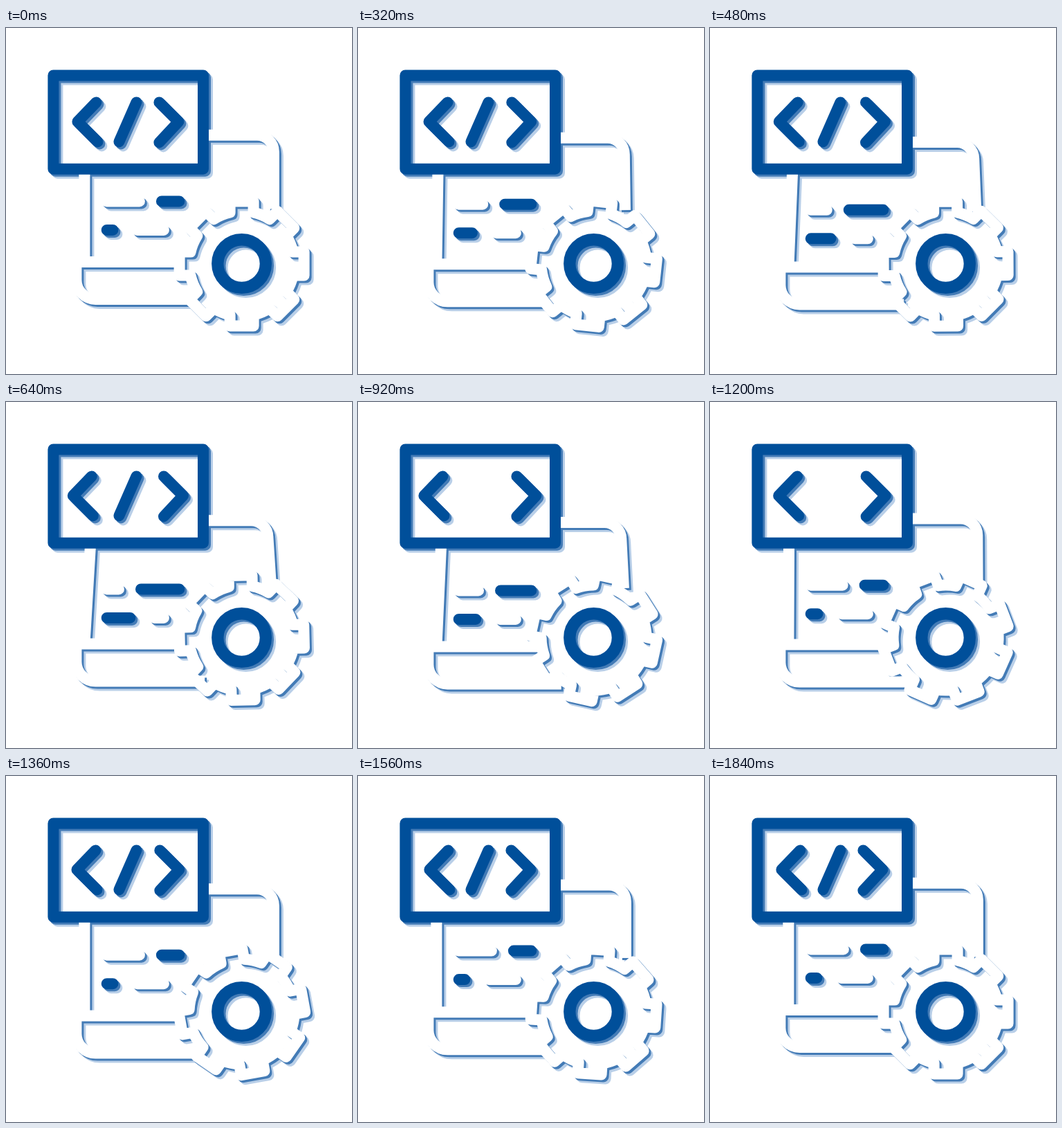
Animation, 500 px wide and 500 px high, one loop 2 s. Source, as an HTML page:

```html
<!DOCTYPE html>
<html lang="en">
<head>
<meta charset="utf-8">
<title>Code and gear</title>
<style>
  html, body { margin: 0; width: 100%; height: 100%; overflow: hidden; background: #fff; }
  svg { display: block; width: 100vw; height: 100vh; }
  #art {
    fill: none; stroke-width: 16;
    filter: drop-shadow(3px 3px 0 #437bb6) drop-shadow(3px 3px 0 #b9cfe8);
  }
  .white { stroke: #fff; }
  .blue { stroke: #004f9a; stroke-linecap: round; stroke-linejoin: round; }
  .bar { stroke-linecap: round; }
</style>
</head>
<body>
<svg viewBox="0 0 500 500">
  <g id="art" transform="translate(-.6 -.6)">
    <path id="page" class="white"/>
    <path id="tray" class="white"/>
    <path id="whiteBars" class="white bar"/>
    <path id="blueBars" class="blue"/>
    <path id="gear" class="white" stroke-linejoin="round"/>
    <circle class="blue" cx="341.2" cy="341.2" r="34.8" stroke-width="17.4"/>
    <rect class="blue" x="69" y="69" width="216.6" height="135.3"/>
    <path id="left" class="blue" d="M131 108L104 136L133 165"/>
    <path id="slash" class="blue" d="M189 108L164 165"/>
    <path id="right" class="blue" d="M222 108L250 136L222 166"/>
  </g>
</svg>
<script>
const LOOP = 2000, STEP = 40, STEPS = 45;
const el = id => document.getElementById(id);
const draw = (id, d) => el(id).setAttribute('d', d);
const place = (id, transform) => el(id).setAttribute('transform', transform);

const ease = x => (1 - Math.cos(Math.PI * Math.min(1, Math.max(0, x)))) / 2;
// Rises from a to b, stays up until c, falls back by d.
const bump = (u, a, b, c, d) => ease((u - a) / (b - a)) - ease((u - c) / (d - c));

function gearPath(teeth, body, tip, half) {
  const foot = Math.sqrt(body * body - half * half);
  let d = '';
  for (let i = 0; i < teeth; i++) {
    const a = i * 2 * Math.PI / teeth, c = Math.cos(a), s = Math.sin(a);
    const at = (x, y) => `${x * c - y * s} ${x * s + y * c}`;
    d += i ? `A${body} ${body} 0 0 1 ` : 'M';
    d += `${at(foot, -half)}L${at(tip, -half)}L${at(tip, half)}L${at(foot, half)}`;
  }
  return d + `A${body} ${body} 0 0 1 ${foot} ${-half}Z`;
}

function render(t) {
  const step = Math.floor(t % LOOP / STEP) - 1;
  const u = Math.min(STEPS, Math.max(0, step)) / STEPS;

  const lean = 9 * bump(u, .05, .38, .38, .7);
  const grow = bump(u, 0, .345, .345, .69);
  const drop = bump(u, .05, .42, .42, .95);
  const sink = 15.5 * bump(u, 0, .5, .5, 1);
  const spread = 8 * bump(u, .08, .43, .5, .8);
  const turn = 102.5 * bump(u, .109, .404, .486, .895);

  // The ends of page and tray stay hidden under the gear.
  const top = 155.4 + 12.5 * drop + .47 * sink, base = 338.5 + sink;
  draw('page', `M${114 + lean} 208L114 ${base}` +
    `M288 ${top}H${363.5 - lean}a24 24 0 0 1 24 24L${387.5 - .45 * lean} ${262 + .5 * sink}`);
  draw('tray', `M${250 + .7 * sink} ${base}H102v26a28 28 0 0 0 28 28H${268 + 1.7 * sink}`);

  const y1 = 251 + 23 * drop, y2 = y1 + 41.5;
  draw('whiteBars', `M146 ${y1}H${193.5 - 30 * grow}M${190 + 25 * grow} ${y2}H228.5`);
  draw('blueBars', `M${225.5 - 30 * grow} ${y1}H251M146.3 ${y2}H${155 + 25 * grow}`);

  place('gear', `translate(341.2 341.2) rotate(${turn})`);
  place('left', `translate(${-spread} 0)`);
  place('right', `translate(${spread} 0)`);
  el('slash').style.display = u > .4 && u < .67 ? 'none' : '';
}

draw('gear', gearPath(8, 76, 90, 17));
const start = performance.now();
(function frame() {
  render(performance.now() - start);
  requestAnimationFrame(frame);
})();
</script>
</body>
</html>
```
